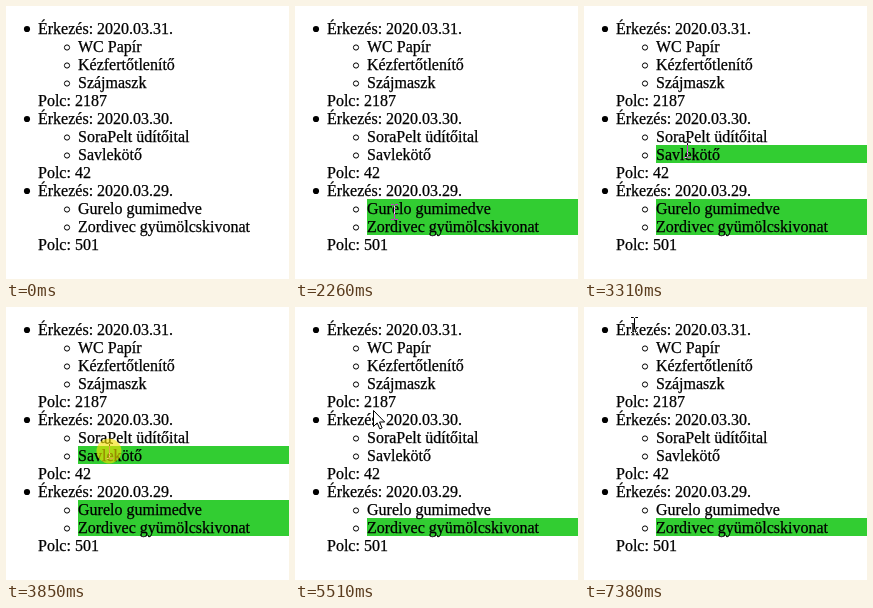
These frames come from a looping animation (283 by 273 pixels, 8000 ms). An HTML page:

```html
<!DOCTYPE html>
<html lang="hu">
<head>
<meta charset="utf-8">
<title>Lista</title>
<style>
  html, body { margin: 0; width: 100%; height: 100%; overflow: hidden; background: #fff; }
  svg { display: block; width: 283px; height: 273px; background: #fff; isolation: isolate; }
  text { font: 16px "Liberation Serif", "Times New Roman", serif; fill: #000; stroke: #000; stroke-width: .25px; }
  #beam { mix-blend-mode: difference; }
</style>
</head>
<body>
<svg id="stage" viewBox="0 0 283 273">
  <rect width="283" height="273" fill="#fff"/>
  <g id="marks"></g>
  <g id="list"></g>
  <path id="beam" d="M-3.5-7.5h2.5l1 1 1-1h2.5M0-6.5v13M-3.5 7.5h2.5l1-1 1 1h2.5" fill="none" stroke="#fff"/>
  <path id="arrow" d="M.5.5v16l3.7-3.6 2.6 6 2.3-1-2.6-5.9h5.2z" fill="#fff" stroke="#000"/>
  <circle id="press" r="12.5" fill="#f5e100" fill-opacity=".62"/>
</svg>
<script>
const LOOP = 8000, TOP = 13, LINE = 18, INDENT = 40;
const $ = id => document.getElementById(id);

const groups = [
  ['2020.03.31.', ['WC Papír', 'Kézfertőtlenítő', 'Szájmaszk'], 2187],
  ['2020.03.30.', ['SoraPelt üdítőital', 'Savlekötő'], 42],
  ['2020.03.29.', ['Gurelo gumimedve', 'Zordivec gyümölcskivonat'], 501]
];

// Each move eases the pointer to (x, y)
const entry = { x: 193, y: 266 };
const moves = [
  { from: 440, to: 1050, x: 124, y: 217 },
  { from: 1640, to: 1950, x: 99, y: 206 },
  { from: 2550, to: 3080, x: 103, y: 144 },
  { from: 3990, to: 4150, x: 104, y: 128 },
  { from: 4380, to: 4820, x: 117, y: 201 },
  { from: 5130, to: 5510, x: 78, y: 103 },
  { from: 5510, to: 5880, x: 50, y: 18 }
];

// Button presses: time down, time up
const presses = [[1330, 1410], [2100, 2180], [3230, 3310], [3390, 3540], [3620, 3700],
  [3850, 3990], [4970, 5130], [6120, 6260], [7230, 7380]];

function add(parent, tag, attrs, content) {
  const el = document.createElementNS('http://www.w3.org/2000/svg', tag);
  for (const key in attrs) el.setAttribute(key, attrs[key]);
  if (content) el.textContent = content;
  return parent.appendChild(el);
}

const rows = [];
function addRow(content, depth, bullet) {
  const x = 32 + INDENT * depth, y = TOP + LINE * rows.length;
  if (bullet === 'disc') add($('list'), 'circle', { cx: x - 11, cy: y + 10, r: 3.1 });
  if (bullet === 'ring') add($('list'), 'circle', { cx: x - 11, cy: y + 10.5, r: 2.6, fill: 'none', stroke: '#000' });
  const text = add($('list'), 'text', { x, y: y + 15 }, content);
  const mark = depth && add($('marks'), 'rect', { x, y, width: 283 - x, height: LINE, fill: '#32cd32' });
  rows.push({ x, y, mark, right: x + text.getComputedTextLength() });
}
for (const [date, items, shelf] of groups) {
  addRow('Érkezés: ' + date, 0, 'disc');
  items.forEach(item => addRow(item, 1, 'ring'));
  addRow('Polc: ' + shelf, 0);
}

function pointerAt(t) {
  let { x, y } = entry;
  for (const m of moves) {
    const k = Math.min(1, Math.max(0, (t - m.from) / (m.to - m.from)));
    const eased = 1 - (1 - k) ** 2;
    x += (m.x - x) * eased;
    y += (m.y - y) * eased;
  }
  return { x: Math.round(x), y: Math.round(y) };
}

const rowAt = y => rows[Math.floor((y - TOP) / LINE)];

function overText({ x, y }) {
  const row = rowAt(y);
  return Boolean(row) && y > row.y && x >= row.x && x <= row.right;
}

// Releasing the button toggles the row below the pointer
const clicks = presses.map(([, up]) => ({ up, row: rowAt(pointerAt(up).y) }));
const isMarked = (row, t) => clicks.filter(c => c.row === row && c.up <= t).length % 2 === 1;

const show = (el, on) => el.setAttribute('visibility', on ? 'visible' : 'hidden');

function draw(t) {
  for (const row of rows) if (row.mark) show(row.mark, isMarked(row, t));
  const p = pointerAt(t), visible = t >= moves[0].from, beam = overText(p);
  $('beam').setAttribute('transform', `translate(${p.x + 0.5} ${p.y})`);
  $('arrow').setAttribute('transform', `translate(${p.x} ${p.y})`);
  $('press').setAttribute('transform', `translate(${p.x} ${p.y})`);
  show($('beam'), visible && beam);
  show($('arrow'), visible && !beam);
  show($('press'), presses.some(([down, up]) => t >= down && t < up));
}

const start = performance.now();
function tick() {
  draw((performance.now() - start) % LOOP);
  requestAnimationFrame(tick);
}
tick();
</script>
</body>
</html>
```
